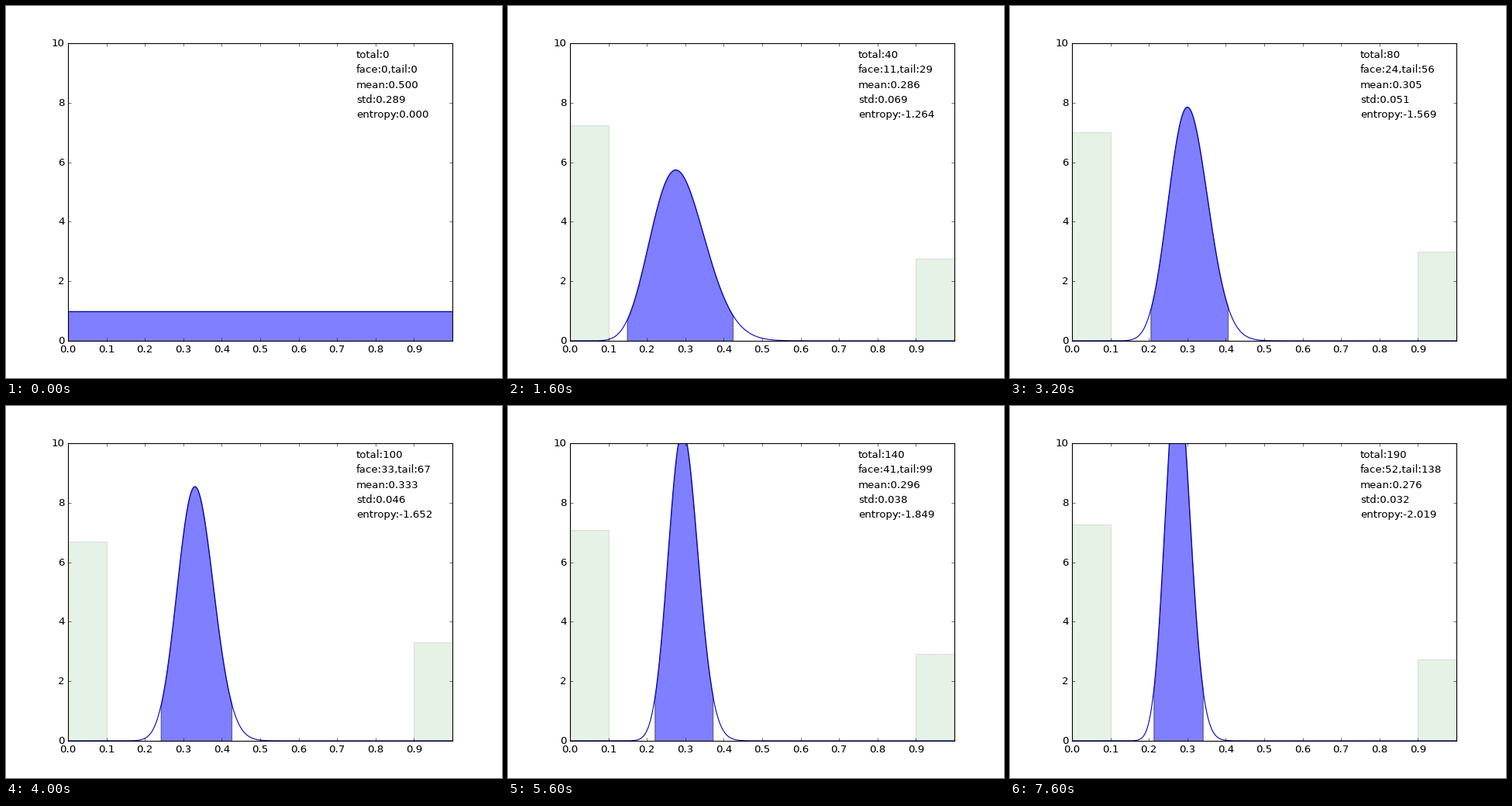
A matplotlib script for the animation above (8000 ms loop, 640x480 px).

```python
import math

import numpy as np
import matplotlib.pyplot as plt
from matplotlib.animation import FuncAnimation

plt.style.use("classic")
plt.rcParams["font.family"] = "DejaVu Sans"
plt.rcParams["text.hinting"] = "native"

BATCH = 10  # tosses per step
FACES = [0, 4, 6, 9, 11, 14, 16, 20, 24, 29,
         33, 35, 37, 38, 41, 43, 45, 47, 50, 52]

x = np.linspace(0, 1, 1000)
fig = plt.figure(figsize=(8, 6), dpi=80, facecolor="white")
ax = fig.add_axes([0.125, 0.1, 0.775, 0.8])


def posterior(p, face, tail):
    log_norm = (math.lgamma(face + tail + 2)
                - math.lgamma(face + 1) - math.lgamma(tail + 1))
    return math.exp(log_norm) * p**face * (1 - p)**tail


def entropy(face, tail, steps=4000):
    mid = (np.arange(steps) + 0.5) / steps
    density = np.maximum(posterior(mid, face, tail), 1e-300)
    return round(-np.mean(density * np.log(density)), 3) + 0.0


def draw(step):
    total = BATCH * step
    face = FACES[step]
    tail = total - face
    a, b = face + 1, tail + 1
    mean = a / (a + b)
    std = math.sqrt(a * b / ((a + b)**2 * (a + b + 1)))

    ax.clear()
    y = posterior(x, face, tail)
    ax.plot(x, y, color="#0000b0", lw=1)
    ax.fill_between(x, 0, y, where=np.abs(x - mean) <= 2 * std,
                    facecolor="blue", edgecolor="black", lw=1, alpha=0.5)
    if total:
        ax.bar([0, 0.9], [10 * tail / total, 10 * face / total], width=0.1,
               align="edge", facecolor="green", edgecolor="black",
               lw=1, alpha=0.1)

    lines = [f"total:{total}", f"face:{face},tail:{tail}",
             f"mean:{mean:.3f}", f"std:{std:.3f}",
             f"entropy:{entropy(face, tail):.3f}"]
    for i, line in enumerate(lines):
        ax.text(0.75, 9.5 - 0.5 * i, line, fontsize=12)

    ax.set_xlim(0, 1)
    ax.set_ylim(0, 10)
    ax.set_xticks(np.arange(10) / 10)
    ax.set_yticks(range(0, 11, 2))


anim = FuncAnimation(fig, draw, frames=len(FACES), init_func=lambda: draw(0),
                     interval=400, repeat=True, repeat_delay=0)
plt.show()
```
